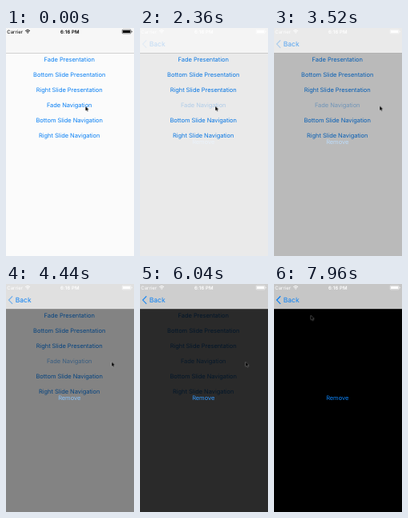
An HTML page that plays this animation: 160 by 285 pixels, repeating every 8 s.

```html
<!DOCTYPE html>
<html lang="en">
<head>
<meta charset="utf-8">
<title>Fade navigation</title>
<style>
  html, body { margin: 0; width: 100%; height: 100%; overflow: hidden; background: #fbfbfb; }
  svg { display: block; width: 100vw; height: 100vh; }
  text { font-family: Inter, Roboto, sans-serif; text-rendering: geometricPrecision; }
  .link { font-size: 7.5px; letter-spacing: -.007em; text-anchor: middle; fill: #0b80f4; }
  .back { font-size: 8.5px; fill: #0b80f4; }
  .status { font-size: 6px; }
</style>
</head>
<body>
<svg viewBox="0 0 160 285">
  <rect width="160" height="285" fill="#fbfbfb"/>
  <g id="menu"></g>

  <g id="page" opacity="0">
    <rect width="160" height="285"/>
    <text class="link" x="79.2" y="145">Remove</text>
  </g>

  <rect id="bar" width="160" height="31" fill="#f7f7f7"/>
  <rect id="line" y="31" width="160" height=".5" fill="#a8a8a8"/>
  <path id="chevron" d="M8.1 15.3 3.5 20.1 8.1 24.9" fill="none" stroke="#0b80f4" stroke-width="1.3" opacity="0"/>
  <text id="back" class="back" x="11.7" y="23.2" opacity="0">Back</text>

  <g id="status" color="#000" fill="currentColor">
    <text class="status" x="1.3" y="6.6">Carrier</text>
    <g fill="none" stroke="currentColor" stroke-width=".9">
      <path d="M24.2 3.6Q27.1 1 30 3.6"/>
      <path d="M25.4 4.9Q27.1 3.4 28.8 4.9"/>
    </g>
    <path d="M26.2 5.8Q27.1 5.1 28 5.8L27.1 6.9Z"/>
    <text class="status" x="79.8" y="6.6" text-anchor="middle" font-weight="600" letter-spacing=".1">6:16 PM</text>
    <rect x="145.2" y="2.1" width="11" height="4.8" rx=".9" fill="none" stroke="currentColor" stroke-width=".5"/>
    <rect x="146" y="2.9" width="9.4" height="3.2" rx=".4"/>
    <rect x="156.9" y="3.7" width=".7" height="1.6" rx=".3"/>
  </g>

  <path id="cursor" d="M0 0V5.4L1.3 4.3 2.2 6.3 3.1 5.9 2.2 4H3.9Z" fill="#000" stroke="#fff" stroke-width=".45" paint-order="stroke"/>
</svg>
<script>
const LOOP = 8000, START = 1100, END = 7950;
const byId = id => document.getElementById(id);

const menu = byId("menu");
for (const [i, style] of ["Presentation", "Navigation"].entries()) {
  for (const [j, kind] of ["Fade", "Bottom Slide", "Right Slide"].entries()) {
    const item = document.createElementNS(menu.namespaceURI, "text");
    item.setAttribute("class", "link");
    item.setAttribute("x", 79.2);
    item.setAttribute("y", 41.7 + 19.15 * (3 * i + j));
    item.textContent = `${kind} ${style}`;
    menu.append(item);
  }
}

// Each step: [time, value, easing towards the next step]
function play(el, prop, steps) {
  const last = steps[steps.length - 1];
  const frames = [...steps, [LOOP, last[1]]].map(([time, value, easing = "linear"]) =>
    ({ offset: time / LOOP, [prop]: value, easing }));
  el.animate(frames, { duration: LOOP, iterations: Infinity });
}

const fade = (el, prop, from, to, end = END, ease = "ease-in-out") =>
  play(el, prop, [[0, from], [START, from, ease], [end, to]]);

fade(byId("page"), "opacity", 0, 1);
fade(byId("chevron"), "opacity", 0, 1);
fade(byId("back"), "opacity", 0, 1, 4200, "ease-in");
fade(byId("bar"), "fill", "#f7f7f7", "#c6c6c6");
fade(byId("line"), "opacity", 1, 0.4);

const hold = "step-end";
play(menu.children[3], "opacity", [
  [0, 1, hold], [680, 0.2, hold], [START, 0.2, "ease-in-out"], [END, 1]
]);
play(byId("status"), "color", [
  [0, "#000", hold], [840, "#888", hold], [960, "#fff"]
]);

const at = (x, y) => `translate(${x}px, ${y}px)`;
const smooth = "ease-in-out";
play(byId("cursor"), "transform", [
  [0, at(99.4, 98), smooth],
  [160, at(45, 38), smooth],
  [360, at(105, 129), smooth],
  [520, at(94.2, 97.8)],
  [2500, at(94.2, 97.8), smooth],
  [3200, at(132.2, 97.5)],
  [7160, at(132.2, 97.5), smooth],
  [7800, at(46.2, 39.3)]
]);
</script>
</body>
</html>
```
